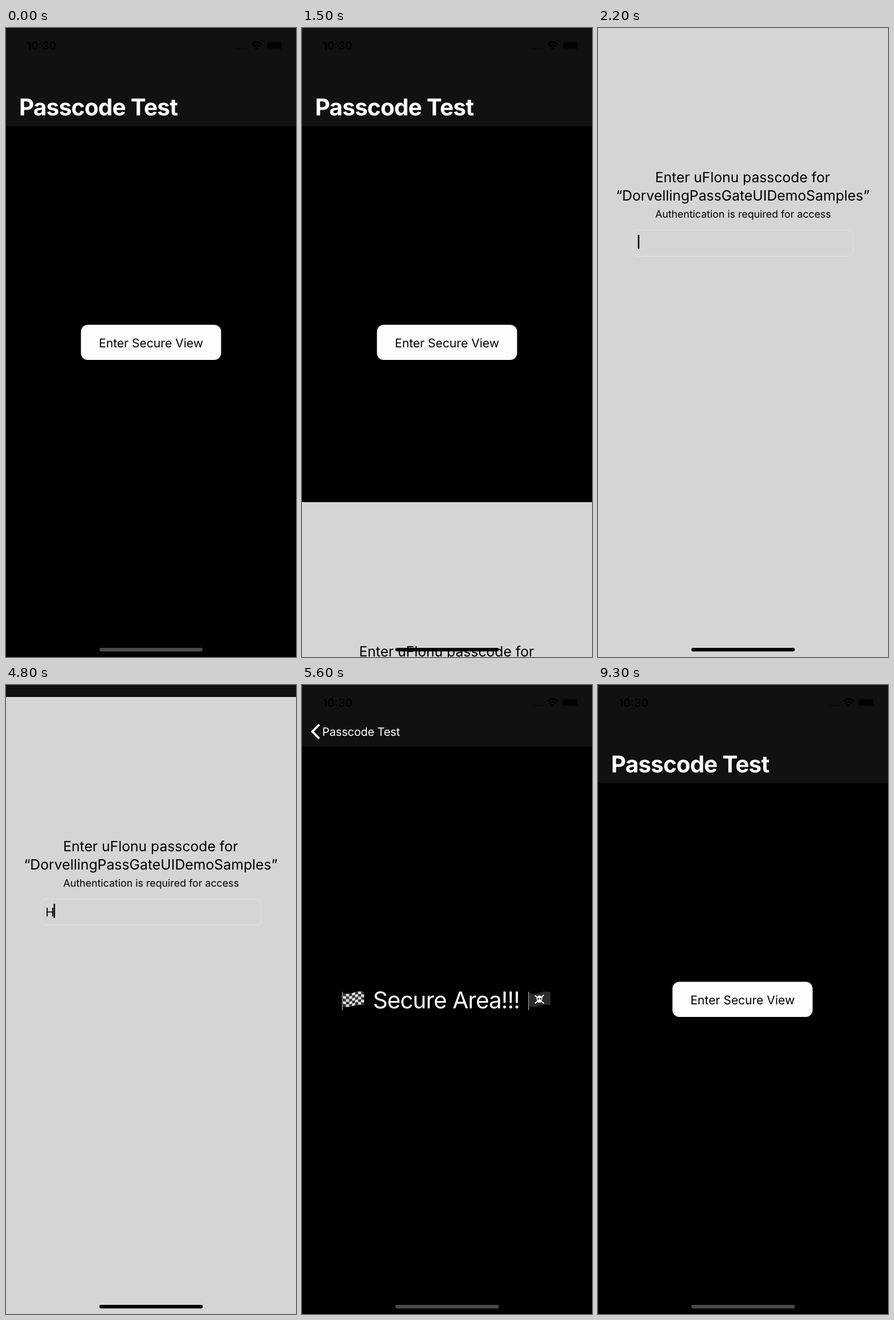
Write an HTML page that moves like this. It is 509 by 1101 pixels and loops after 9500 ms.

```html
<!DOCTYPE html>
<html lang="en">
<head>
<meta charset="utf-8">
<title>Passcode Test</title>
<style>
  html, body { margin: 0; width: 100%; height: 100%; overflow: hidden; background: #000; }
  svg { display: block; position: fixed; left: 0; top: 0; }
  text { font-family: Inter, "Open Sans", sans-serif; font-optical-sizing: none; text-rendering: geometricPrecision; }
  .mid { text-anchor: middle; }
</style>
</head>
<body>
<svg width="509" height="1101" viewBox="0 0 509 1101">
  <defs>
    <linearGradient id="edge">
      <stop offset="0" stop-opacity="0"/>
      <stop offset="1" stop-opacity=".1"/>
    </linearGradient>
  </defs>
  <rect width="509" height="1101"/>

  <g id="home">
    <rect x="131.5" y="519.5" width="246" height="61.5" rx="12" fill="#fefcff"/>
    <text id="enter" class="mid" x="254.5" y="558.6" font-size="21.1">Enter Secure View</text>
  </g>
  <rect id="dim" y="172" width="509" height="929"/>

  <g id="secure">
    <rect x="-11" width="11" height="1101" fill="url(#edge)"/>
    <rect width="509" height="1101"/>
    <g id="checkers"></g>
    <text x="124.4" y="566" font-size="40.5" letter-spacing="-.92" fill="#fff">Secure Area!!!</text>
    <g id="pirate"></g>
  </g>

  <rect id="bar" width="509" height="172" fill="#121013"/>
  <g id="status">
    <text x="36" y="38" font-size="19.5" font-weight="600">10:30</text>
    <g fill="#0a090b">
      <circle cx="404.5" cy="36" r="1.8"/><circle cx="410.5" cy="36" r="1.8"/>
      <circle cx="416.5" cy="36" r="1.8"/><circle cx="422.5" cy="36" r="1.8"/>
    </g>
    <g fill="none" stroke="#000" stroke-width="3">
      <path d="M430.8 28.6Q439.7 20.6 448.6 28.6"/>
      <path d="M434 32.1Q439.7 27 445.4 32.1"/>
    </g>
    <path d="M436.4 34.6Q439.7 31.8 443 34.6L439.7 38Z"/>
    <rect x="456.2" y="23.2" width="29" height="14.6" rx="4" fill="none" stroke="#09080a"/>
    <rect x="458.2" y="25.2" width="25" height="10.6" rx="2.4"/>
    <path d="M486.6 28.2Q488.6 30.5 486.6 32.8Z" fill="#09080a"/>
  </g>
  <text id="title" font-size="40.5" font-weight="700" letter-spacing="-.75" fill="#fff">Passcode Test</text>
  <g id="back">
    <path d="M30.3 69.2L18.3 81.5L30.3 93.8" fill="none" stroke="#fff" stroke-width="3.8"/>
    <text x="35.6" y="88.7" font-size="20" letter-spacing="-.15" fill="#fff">Passcode Test</text>
  </g>

  <g id="sheet">
    <rect width="509" height="1101" fill="#d6d4d7"/>
    <g class="mid">
      <text x="253.7" y="270" font-size="24.7">Enter uFlonu passcode for</text>
      <text x="254" y="302" font-size="24.8">“DorvellingPassGateUIDemoSamples”</text>
      <text x="254.7" y="332.2" font-size="17.8">Authentication is required for access</text>
    </g>
    <rect x="62" y="353.5" width="385.5" height="46" rx="7" fill="none" stroke="#e0dee1" stroke-width="1.2"/>
    <text id="typed" x="69.5" y="383.6" font-size="20.6">H</text>
    <rect id="caret" y="362" width="2.5" height="25"/>
  </g>
  <rect id="indicator" x="163.8" y="1085" width="181.6" height="6.2" rx="3.1"/>
</svg>
<script>
const LOOP = 9500, STEP = 100, W = 509, H = 1101, RATE = 0.0265;
const el = id => document.getElementById(id);
const set = (id, name, value) => el(id).setAttribute(name, value);
const move = (id, x, y) => set(id, 'transform', `translate(${x} ${y})`);
const mix = (a, b, k) => a + (b - a) * k;

// critically damped spring from 0 to 1
function spring(t, start) {
  const x = RATE * Math.max(0, t - start);
  return 1 - (1 + x) * Math.exp(-x);
}

// point on a waving cloth, u and v in 0..1
function clothPoint(left, u, v) {
  const y = 539.5 + v * 23 + 1.6 * Math.sin(u * 6.3) - 2 * u;
  return `${(left + u * 37).toFixed(2)} ${y.toFixed(2)}`;
}

function patch(left, u0, v0, u1, v1) {
  const pts = [];
  for (let i = 0; i <= 12; i++) pts.push(clothPoint(left, mix(u0, u1, i / 12), v0));
  for (let i = 12; i >= 0; i--) pts.push(clothPoint(left, mix(u0, u1, i / 12), v1));
  return `M${pts.join('L')}Z`;
}

function flag(x, cloth) {
  return `<rect x="${x}" y="537" width="1.6" height="32.5" rx=".8" fill="#8b8b8d"/>` +
    `<path d="${patch(x + 2, 0, 0, 1, 1)}" fill="${cloth}"/>`;
}

function drawFlags() {
  const cols = 7, rows = 5;
  let dark = '';
  for (let c = 0; c < cols; c++)
    for (let r = 0; r < rows; r++)
      if ((c + r) % 2 === 0) dark += patch(72, c / cols, r / rows, (c + 1) / cols, (r + 1) / rows);
  el('checkers').innerHTML = flag(70, '#dededf') + `<path d="${dark}" fill="#353536"/>`;
  el('pirate').innerHTML = flag(397, '#2b2b2d') +
    '<path d="M409.5 544L424 557M424 543L409.5 557" stroke="#eee" stroke-width="2.2" stroke-linecap="round"/>' +
    '<ellipse cx="416.7" cy="548.5" rx="5.2" ry="5" fill="#eee"/>' +
    '<rect x="413.7" y="551" width="6" height="5" rx="1.5" fill="#eee"/>' +
    '<g fill="#2b2b2d"><circle cx="414.6" cy="549.4" r="1.4"/><circle cx="418.8" cy="549.4" r="1.4"/></g>';
}

function render(now) {
  const t = Math.floor((now % LOOP) / STEP) * STEP;

  // the sheet pauses for one step on its way up and down
  const up = spring(t < 1600 ? t : t - STEP, 1464.1);
  const down = spring(t < 5100 ? t : t - STEP, 4792.15);
  move('sheet', 0, Math.round(H * (1 - up + down)));
  const typed = t >= 4800;
  set('typed', 'opacity', +typed);
  set('caret', 'x', typed ? 83.6 : 70);
  set('caret', 'opacity', +(t >= 2200));
  set('enter', 'opacity', t === 1400 ? 0.5 : 1);
  set('indicator', 'fill', t >= 1500 && t < 5600 ? '#000' : '#4a4a4a');

  // p: 1 on the first page, 0 on the secure page
  const p = t < 4800 ? 1 : spring(t, 9024);
  move('home', -0.3 * W * (1 - p), 0);
  set('dim', 'opacity', 0.08 * (1 - p));
  move('secure', W * p, 0);
  set('secure', 'visibility', p === 1 ? 'hidden' : 'visible');

  const q = Math.pow(p, 1.17);
  set('bar', 'height', mix(108, 172, q));
  set('title', 'transform',
    `translate(${mix(34.3, 23, q)} ${mix(88.7, 153, q)}) scale(${mix(0.49, 1, q)})`);
  set('title', 'opacity', p);
  set('back', 'opacity', p === 0 ? 1 : 0);
}

drawFlags();
const begin = performance.now();
function tick() {
  render(performance.now() - begin);
  requestAnimationFrame(tick);
}
tick();
</script>
</body>
</html>
```
